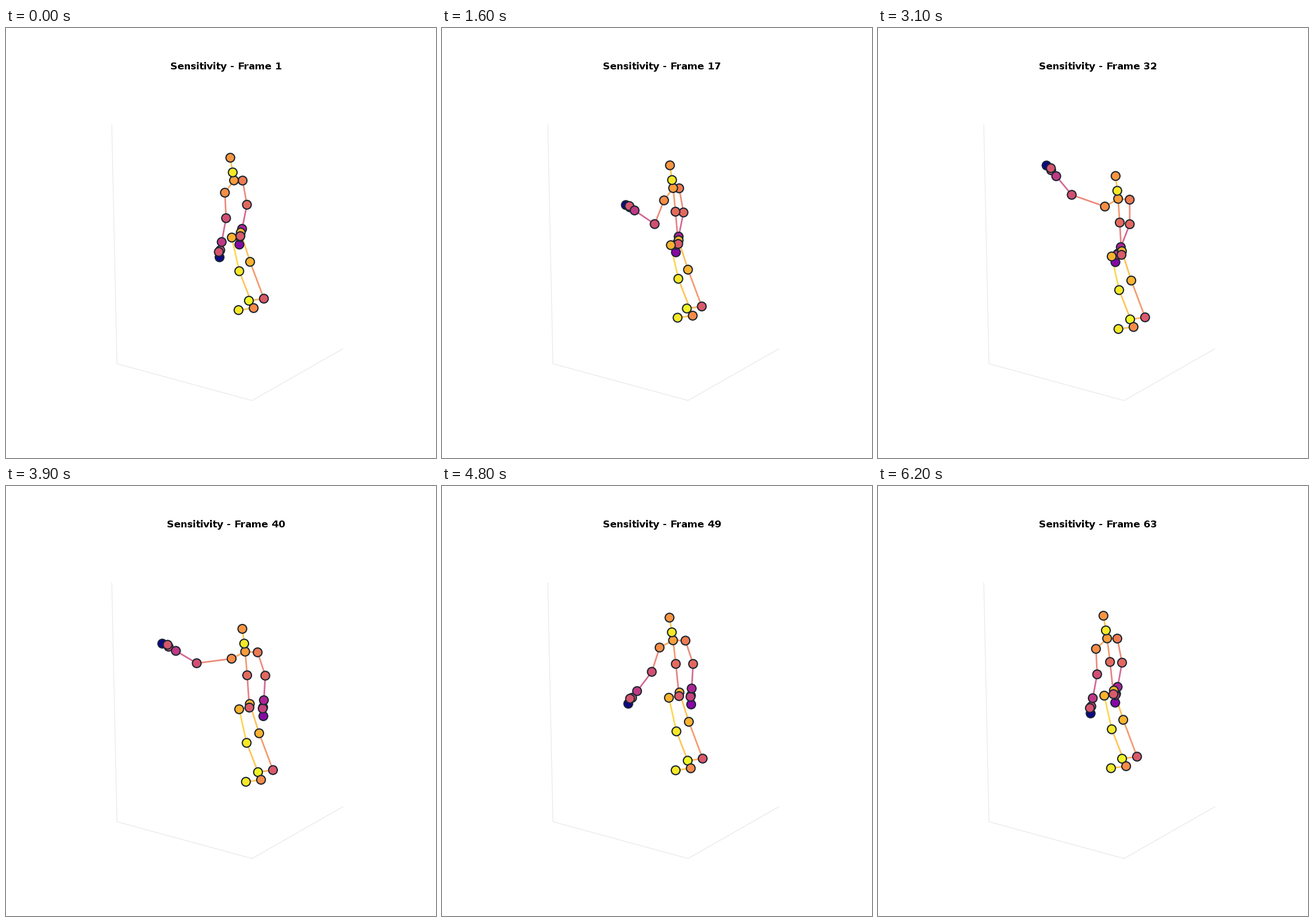
These frames come from a looping animation (748x748 px, 6300 ms). A matplotlib script:

```python
import numpy as np
import matplotlib.pyplot as plt
from matplotlib.animation import FuncAnimation
from matplotlib.collections import LineCollection

SIZE, DPI = 748, 100
FRAMES, STEP_MS = 63, 100
PLASMA = plt.get_cmap("plasma")
plt.rcParams.update({"text.hinting": "default", "text.hinting_factor": 1})
T = np.arange(FRAMES)

# Back to front. Each joint: parent, heat, and offset from the parent at rest.
BODY = {
    "l_tip": ("l_wrist", 0.28, -4.7 + 27.3j),
    "l_thumb": ("l_wrist", 0.54, -3 + 12j),
    "l_hand": ("l_wrist", 0.48, -4 + 14j),
    "l_wrist": ("l_elbow", 0.38, -8.4 + 42j),
    "l_elbow": ("l_shoulder", 0.61, 7.5 + 42j),
    "l_shoulder": ("chest", 0.67, 15 + 0.3j),
    "l_ankle": ("l_knee", 0.565, 24 + 64j),
    "l_knee": ("l_hip", 0.83, 16.3 + 51j),
    "l_foot": ("l_ankle", 0.99, -26 + 3.6j),
    "l_hip": ("pelvis", 0.83, 0.7 - 6.3j),
    "spine": ("pelvis", 0.62, -6 - 56j),
    "pelvis": (None, 0.57, 0j),
    "chest": ("spine", 0.77, -5 - 41j),
    "head": ("neck", 0.75, -4.2 - 25.5j),
    "neck": ("chest", 0.96, -2.2 - 13.9j),
    "r_tip": ("r_wrist", 0.0, -3.7 + 26.5j),
    "r_hand": ("r_wrist", 0.55, -2.5 + 14.3j),
    "r_thumb": ("r_wrist", 0.55, -5 + 17.2j),
    "r_wrist": ("r_elbow", 0.45, -7.6 + 41.5j),
    "r_elbow": ("r_shoulder", 0.53, 2 + 44.3j),
    "r_shoulder": ("chest", 0.73, -15.8 + 21.4j),
    "r_ankle": ("r_knee", 0.72, 25 + 64.2j),
    "r_knee": ("r_hip", 0.96, 13 + 58.5j),
    "r_foot": ("r_ankle", 0.96, -26.3 + 3.5j),
    "r_hip": ("pelvis", 0.83, -14.8 + 2.4j),
}


def ease(start, end):
    s = np.clip((T - start) / (end - start), 0, 1)
    return s * s * (3 - 2 * s)


def pulse(start, top, leave, end):
    """Rise, hold, and fall again."""
    return ease(start, top) - ease(leave, end)


# The throw: crouch, cock the arm, turn and reach out, then settle.
crouch = pulse(4, 31, 32, 52)
cock = pulse(5, 23, 24, 33)
turn = pulse(23, 33, 45, 75)
reach = pulse(23, 31, 39, 48)
yaw = turn - cock
lift = 112 * pulse(10, 30, 32, 54)
bend = 135 * cock + 25 * pulse(30, 39, 40, 52)

pelvis_x = (407.6 + 4.5 * pulse(0, 10, 12, 24)
            + 16 * pulse(23, 31, 38, 53) + 2 * ease(39, 62))
pelvis_y = 362.1 + 32.5 * crouch

# Rotation in degrees away from rest; other joints follow their parent.
SWING = {
    "pelvis": 0 * T,
    "spine": 3 * crouch,
    "r_shoulder": 26 * turn,
    "r_elbow": lift,
    "r_wrist": lift + bend,
    "l_elbow": 10 * pulse(18, 30, 31, 38) - 8 * pulse(32, 39, 48, 66),
}
# Apparent length relative to rest.
STRETCH = {
    "r_elbow": 1 + 0.38 * reach,
    "l_shoulder": 1 + 0.45 * yaw,
    "r_hip": 1 + 0.2 * yaw,
    **dict.fromkeys(["r_hand", "r_thumb", "r_tip"], 1 - 0.5 * cock),
}


def spin(name):
    return SWING[name] if name in SWING else spin(BODY[name][0])


def place(name):
    parent, _, rest = BODY[name]
    if parent is None:
        return pelvis_x + 1j * pelvis_y
    arm = rest * STRETCH.get(name, 1) * np.exp(1j * np.radians(spin(name)))
    return place(parent) + arm


names = list(BODY)
joints = np.array([place(name) for name in names])
joints[names.index("spine"), 0] = np.nan  # not tracked in the first pose
points = np.stack([joints.real, joints.imag], axis=-1)

heat = np.array([BODY[name][1] for name in names])
bones = np.array([(names.index(BODY[name][0]), i)
                  for i, name in enumerate(names) if BODY[name][0]])

fig = plt.figure(figsize=(SIZE / DPI, SIZE / DPI), dpi=DPI, facecolor="white")
ax = fig.add_axes([0, 0, 1, 1])
ax.set_xlim(0, SIZE)
ax.set_ylim(SIZE, 0)
ax.axis("off")

ax.plot([184, 193, 428, 586], [168.5, 584, 648, 558], color="#e6e6e6", lw=0.8)
title = ax.text(383.2, 72, "", ha="center", va="baseline",
                fontsize=12, fontweight="bold", family="DejaVu Sans")
sticks = LineCollection([], colors=PLASMA(heat[bones].mean(axis=1)),
                        linewidths=2, alpha=0.8, zorder=2)
ax.add_collection(sticks, autolim=False)
dots = ax.scatter(*points[:, 1].T, s=120, c=PLASMA(heat),
                  edgecolors="#1a2530", linewidths=1.5, zorder=3)


def draw(n):
    title.set_text(f"Sensitivity - Frame {n + 1}")
    sticks.set_segments(points[bones, n])
    dots.set_offsets(points[:, n])
    return title, sticks, dots


anim = FuncAnimation(fig, draw, frames=FRAMES, interval=STEP_MS,
                     repeat=True, repeat_delay=0)
plt.show()
```
